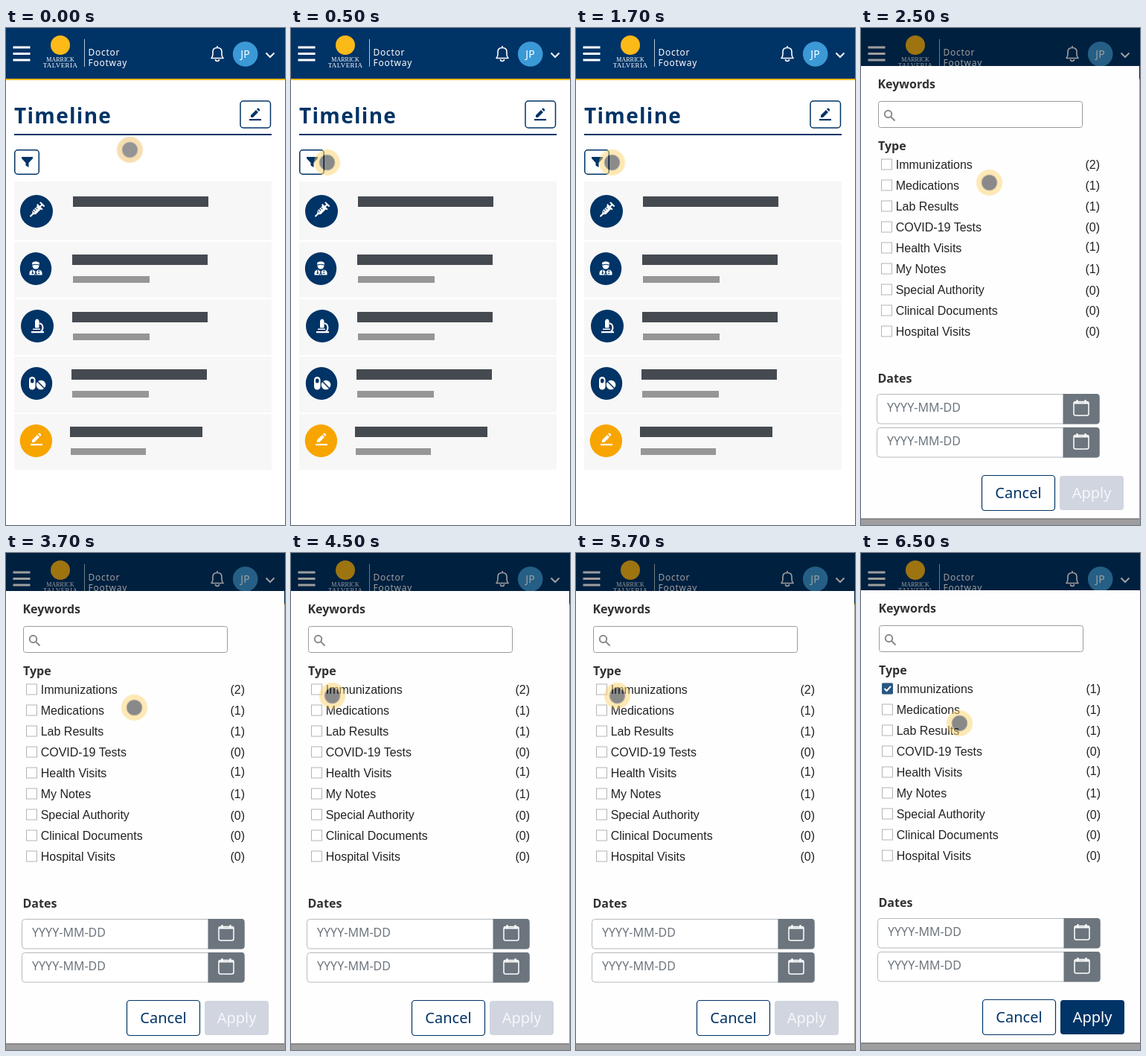
Write an HTML page that moves like this. It is 375x667 px and loops after 8 s.

```html
<!DOCTYPE html>
<html lang="en">
<head>
<meta charset="utf-8">
<title>Timeline filter</title>
<style>
  html, body { margin: 0; width: 100%; height: 100%; overflow: hidden; background: #fff; }
  svg { display: block; width: 375px; height: 667px; }
  text { font-family: "Noto Sans", "Open Sans", sans-serif; }
  .logo { font-family: "Liberation Serif", serif; fill: #fff; text-anchor: middle; }
  .brand { font-size: 12px; letter-spacing: .75px; fill: #fff; }
  .head { font-size: 16px; font-weight: 700; fill: #313132; }
  .types text { font: 16px "Liberation Sans", Arial, sans-serif; fill: #222; }
  .types rect { fill: #fff; stroke: #b4b4b4; }
  .hint { font-size: 16px; fill: #6c757d; }
  .btn { font-size: 20px; text-anchor: middle; }
  .bar { fill: #454a51; }
  .sub { fill: #969696; }
  .navy { fill: #036; }
  .box { fill: #fff; stroke: #036; stroke-width: 1.5; }

  .cursor, .modal, .sheet, .before, .after, .ring, .dot { animation: 8s step-end infinite; }
  .cursor { animation-name: move; }
  .modal { animation-name: open; }
  .sheet { animation-name: nudge; }
  .before { animation-name: hide; }
  .after { animation-name: show; }
  .ring { animation-name: ring; fill: none; stroke-width: 7; }
  .dot { animation-name: dot; fill: #000; }

  @keyframes move {
    0% { transform: translate(166.5px, 163.5px); }
    6.25% { transform: translate(48.5px, 180.5px); }
    31.25% { transform: translate(172.5px, 207.5px); }
    56.25% { transform: translate(55.5px, 191.5px); }
    81.25%, 100% { transform: translate(132.5px, 228.5px); }
  }
  @keyframes open { 0% { visibility: hidden; } 31.25%, 100% { visibility: visible; } }
  @keyframes nudge { 0% { transform: none; } 81.25%, 100% { transform: translate(1px, -1px); } }
  @keyframes hide { 0% { opacity: 1; } 81.25%, 100% { opacity: 0; } }
  @keyframes show { 0% { opacity: 0; } 81.25%, 100% { opacity: 1; } }
  @keyframes ring { 0% { stroke: rgba(240, 190, 100, .5); } 6.25%, 100% { stroke: rgba(253, 209, 105, .5); } }
  @keyframes dot { 0% { fill-opacity: .42; } 6.25%, 100% { fill-opacity: .46; } }
</style>
</head>
<body>
<svg viewBox="0 0 375 667">
  <defs>
    <g id="pencil">
      <path d="M-6 4V1L1-6 4-3-3 4ZM2-7 3.2-8.2Q4-8.7 4.8-8L6-6.8Q6.5-6 6-5.2L5-4Z"/>
      <rect x="-8" y="6" width="16" height="2.2"/>
    </g>
    <g id="date">
      <rect x="21.5" y="491.5" width="299" height="39.5" rx="4" fill="#fff" stroke="#b5babf"/>
      <path d="M271.5 491H316.500a4 4 0 0 1 4 4V527.500a4 4 0 0 1-4 4H271.500Z" fill="#6c757d"/>
      <rect x="286" y="501.500" width="20" height="18.500" rx="2.500" fill="none" stroke="#fff" stroke-width="1.500"/>
      <path d="M286 503.500H306M290.500 499V503M301.500 499V503" fill="none" stroke="#fff" stroke-width="2"/>
      <text class="hint" x="35" y="514.5">YYYY-MM-DD</text>
    </g>
  </defs>

  <!-- header -->
  <rect class="navy" width="375" height="68"/>
  <rect y="68" width="375" height="2" fill="#fcba19"/>
  <path d="M9.500 26H32.500M9.500 34.500H32.500M9.500 43H32.500" stroke="#fff" stroke-width="3"/>
  <circle cx="73" cy="23" r="13" fill="#fcba19"/>
  <text class="logo" x="73" y="45" font-size="8">MARRICK</text>
  <text class="logo" x="73" y="52.5" font-size="9" letter-spacing=".4">TALVERIA</text>
  <path d="M105.500 15V52" stroke="#b9c6d5"/>
  <text class="brand" x="110.500" y="37">Doctor</text>
  <text class="brand" x="110.500" y="51">Footway</text>
  <path d="M276 40.500Q278 38.500 278 35V32Q278 26.500 284 26.500T290 32V35Q290 38.500 292 40.500ZM284 24V26.500M281.500 42Q281.500 44.500 284 44.500T286.500 42" fill="none" stroke="#fff" stroke-width="1.600" stroke-linejoin="round"/>
  <circle cx="321.700" cy="35" r="16.800" fill="#3b99d6"/>
  <text x="321.500" y="39.500" font-size="14" fill="#fff" text-anchor="middle">JP</text>
  <path d="M349.500 33.500 355 39 360.500 33.500" fill="none" stroke="#fff" stroke-width="2"/>

  <!-- page title -->
  <text class="navy" x="11" y="128" font-size="28" font-weight="700" letter-spacing="1.3">Timeline</text>
  <rect class="box" x="315" y="98" width="40.500" height="36" rx="4"/>
  <use href="#pencil" class="navy" x="335" y="116"/>
  <rect class="navy" x="11" y="142" width="346" height="2"/>
  <rect class="box" x="11.750" y="163.750" width="32.500" height="32.500" rx="4"/>
  <path class="navy" d="M21 173H36V175L30.500 181V187L26.500 184.500V181L21 175Z"/>

  <g id="rows"></g>

  <!-- row icons -->
  <g fill="#fff">
    <g transform="translate(41 244.500) rotate(45)">
      <path d="M-4-12H4V-10H1V-7H5V-5H3.300V4.500L1 7V12H-1V7L-3.300 4.500V-5H-5V-7H-1V-10H-4Z"/>
      <path d="M-3.300-2H0M-3.300 1H0M-3.300 4H0" stroke="#036" stroke-width="1"/>
    </g>
    <circle cx="40" cy="319" r="4.500"/>
    <path d="M35.500 317.500 35 315Q40 311.500 45 315L44.500 317.500Z"/>
    <path d="M31.500 331.500V329Q31.500 324.500 37 324.500L40 327.500 43 324.500Q48.500 324.500 48.500 329V331.500Z"/>
    <path d="M36 318Q40 316.500 44 318M35.800 325V328M44.200 325V328M40 327.500 38.500 331.500M40 327.500 41.500 331.500" fill="none" stroke="#036" stroke-width="1.100"/>
    <circle cx="35.800" cy="329" r="1.200" fill="#036"/>
    <path d="M43 329.500H45.500" stroke="#036"/>
    <rect x="39" y="392" width="5.500" height="10.500" rx="1.200"/>
    <rect x="40" y="390.800" width="3.500" height="3"/>
    <path d="M36 403.500H46V405H36ZM34 407H51V409.200H34Z"/>
    <path d="M44.500 396.200Q49.500 397 49.500 402 49.500 405.500 46.500 408" fill="none" stroke="#fff" stroke-width="2"/>
    <rect x="31" y="468" width="8.500" height="17.500" rx="4.250"/>
    <rect x="33" y="470.500" width="4.500" height="6" rx="2" class="navy"/>
    <circle cx="47" cy="479" r="6.300"/>
    <path d="M42 474 52 484" stroke="#036" stroke-width="1.600"/>
    <use href="#pencil" x="41" y="552"/>
  </g>

  <!-- filter dialog -->
  <g class="modal">
    <rect width="375" height="667" fill-opacity=".38"/>
    <g class="sheet">
      <rect x="-1" y="51" width="375" height="608.500" fill-opacity=".2"/>
      <rect x="-1" y="51" width="375" height="607" fill="#fefefe"/>
      <text class="head" x="22.500" y="81">Keywords</text>
      <rect x="23.500" y="98.500" width="274" height="35" rx="3" fill="#fff" stroke="#9a9a9a"/>
      <g fill="none" stroke="#8a8a8a" stroke-width="2">
        <circle cx="36.500" cy="115.500" r="4.700"/>
        <path d="M40 119 45.500 124.500"/>
      </g>
      <text class="head" x="23" y="164">Type</text>
      <g id="types" class="types"></g>
      <g class="after">
        <rect x="27" y="175.500" width="15" height="15" rx="2" fill="#285680"/>
        <path d="M30.500 183 33.500 186 39 179.800" fill="none" stroke="#fff" stroke-width="2"/>
      </g>
      <text class="head" x="22.500" y="476">Dates</text>
      <use href="#date"/>
      <use href="#date" y="45"/>
      <rect class="box" x="162.500" y="600.500" width="98" height="47" rx="4" style="stroke-width:1.2"/>
      <text class="btn navy" x="211.500" y="631">Cancel</text>
      <rect class="before" x="267" y="601" width="86" height="46" rx="4" fill="#d0d5df"/>
      <rect class="after navy" x="267" y="601" width="86" height="46" rx="4"/>
      <text class="btn before" x="310" y="631" fill="#f5f7fa">Apply</text>
      <text class="btn after" x="310" y="631" fill="#fff">Apply</text>
    </g>
  </g>

  <g class="cursor">
    <circle class="ring" r="14"/>
    <circle class="dot" r="10.500"/>
  </g>
</svg>
<script>
  const fill = (id, html) => { document.getElementById(id).innerHTML = html; };
  const rect = (x, y, w, h, cls) => `<rect x="${x}" y="${y}" width="${w}" height="${h}" class="${cls}"/>`;
  const text = (x, y, str, cls = "") => `<text x="${x}" y="${y}" class="${cls}">${str}</text>`;

  // icon centre x, icon half width, bar x, bar width, second bar width
  const rows = [
    [41, 22, 90, 182, 0],
    [40, 21.2, 89, 182, 103],
    [42, 22, 89, 182, 103],
    [41, 21.2, 88, 182, 103],
    [40.4, 21.7, 86, 178, 101],
  ];
  fill("rows", rows.map(([cx, rx, x, w, sub], i) => {
    const y = 77 * i;
    const top = i ? 210 + y : 206;
    return `<rect x="11" y="${top}" width="346" height="${285 + y - top}" fill="#f7f7f7"/>` +
      `<ellipse cx="${cx}" cy="${246 + y}" rx="${rx}" ry="22" fill="${i < 4 ? "#036" : "#f8a500"}"/>` +
      rect(x, (i ? 227 : 226) + y, w, 14, "bar") +
      (sub ? rect(x + 1, 256 + y, sub, 9, "sub") : "");
  }).join(""));

  const types = [
    ["Immunizations", 2], ["Medications", 1], ["Lab Results", 1],
    ["COVID-19 Tests", 0], ["Health Visits", 1, -2], ["My Notes", 1],
    ["Special Authority", 0, 1], ["Clinical Documents", 0], ["Hospital Visits", 0],
  ];
  fill("types", types.map(([name, count, dy = 0], i) => {
    const y = 189 + 28 * i;
    const num = (n, cls) => text(301.5, y + dy, `(${n})`, cls);
    return rect(27.5, y - 13, 14, 14, "") + text(46.7, y, name) +
      (i ? num(count) : num(count, "before") + num(1, "after"));
  }).join(""));
</script>
</body>
</html>
```
